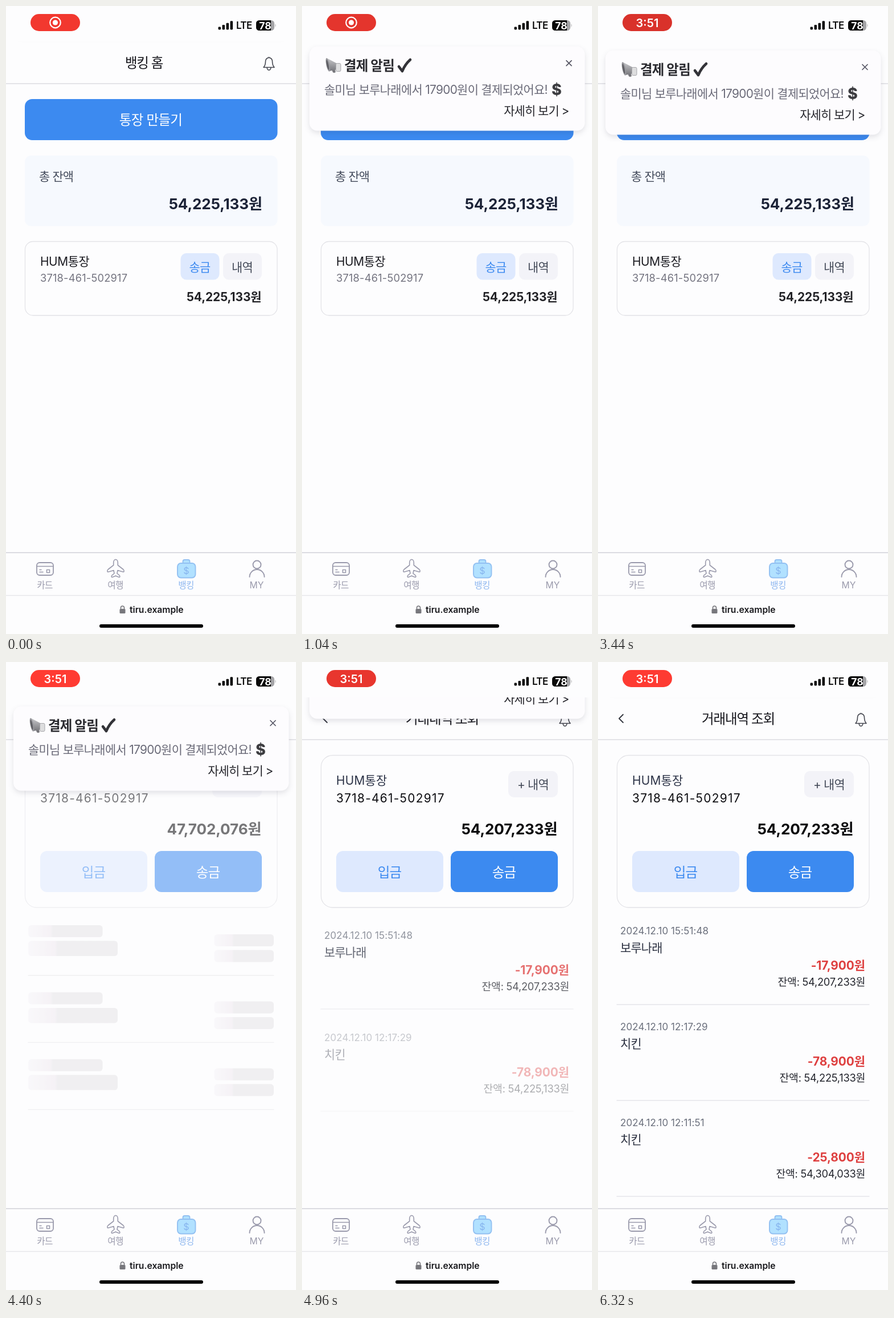
These frames come from a looping animation (509 by 1100 pixels, 6400 ms). An HTML page:

```html
<!DOCTYPE html>
<html lang="ko">
<head>
<meta charset="utf-8">
<title>뱅킹</title>
<style>
  html, body { margin: 0; width: 100%; height: 100%; overflow: hidden; background: #fdfdfe; }
  svg { display: block; width: 100%; height: 100%; }
  text { font-family: Inter, 'Noto Sans CJK KR', sans-serif; white-space: pre; }
  .toast { filter: drop-shadow(0 4px 5px rgba(30, 30, 60, .12)); }
  .line { fill: none; stroke-linecap: round; stroke-linejoin: round; }
</style>
</head>
<body>
<svg id="stage" viewBox="0 0 509 1100"></svg>
<script>
const LOOP = 6400, STEP = 80;
const PAGE_AT = 4235, ROWS_AT = 4760, CLOCK_AT = 1520;
const TOTAL = 54207233;
const BG = '#fdfdfe', BLUE = '#3c8af0', PALE = '#dee9fe', GREY = '#f3f3f8', NAV = '#9a9aac';
const ACCOUNT = 'HUM통장', NUMBER = '3718-461-502917';

// cy is the optical middle of the text line
function text(str, x, cy, size, fill, { anchor = 'start', weight = 400, gap = -.04, id = '' } = {}) {
  return `<text id="${id}" x="${x}" y="${cy + size * .365}" font-size="${size}" fill="${fill}"
    text-anchor="${anchor}" font-weight="${weight}" letter-spacing="${gap * size}">${str}</text>`;
}
const mid = (str, x, cy, size, fill, more) => text(str, x, cy, size, fill, { anchor: 'middle', ...more });
const end = (str, x, cy, size, fill, more) => text(str, x, cy, size, fill, { anchor: 'end', ...more });
const box = (x, y, w, h, r, fill, more = '') =>
  `<rect x="${x}" y="${y}" width="${w}" height="${h}" rx="${r}" fill="${fill}" ${more}/>`;
const line = (d, color, width, more = '') =>
  `<path class="line" d="${d}" stroke="${color}" stroke-width="${width}" ${more}/>`;
const rule = (y, color, x1 = 0, x2 = 509) => line(`M${x1} ${y}H${x2}`, color, 1.3);
const outline = 'stroke="#e4e4e8" stroke-width="1.3"';
const bold = { weight: 700, gap: -.004 };

const home = `<g id="home">
  ${mid('뱅킹 홈', 242, 99, 23.5, '#16161c', { weight: 500, gap: -.055 })}
  ${box(33, 163, 443.5, 72, 13, BLUE)}
  ${mid('통장 만들기', 254, 199, 23.5, '#fff', { gap: -.03 })}
  ${box(33, 262, 443.5, 123.5, 11, '#f6f9fe')}
  ${text('총 잔액', 58, 298, 20.9, '#434a5a')}
  ${end('54,225,133원', 450, 346, 26.1, '#1c2337', bold)}
  ${box(33.5, 412.5, 442.5, 129.5, 14, BG, outline)}
  ${text(ACCOUNT, 60, 447, 20.9, '#1c1c22', { gap: -.02 })}
  ${text(NUMBER, 60, 476, 18.3, '#747480', { gap: .01 })}
  ${box(306.5, 433, 68, 46.5, 10, PALE)}
  ${mid('송금', 340, 457, 20.9, BLUE)}
  ${box(381, 433, 68, 46.5, 10, GREY)}
  ${mid('내역', 414.5, 457, 20.9, '#444a58')}
  ${end('54,225,133원', 448.5, 509, 20.9, '#222226', bold)}
</g>`;

const bar = (x, y, w, h) => box(x, y, w, h, 5.5, 'url(#shimmer)');
const skeleton = [0, 1, 2].map(i => `<g transform="translate(0 ${i * 117.4})">
  ${bar(39, 461, 130.5, 21)}${bar(39, 488.5, 157, 26.5)}
  ${bar(365.5, 477, 104.5, 21)}${bar(365.5, 504.5, 104.5, 21)}
  ${rule(549, '#e4e4e8', 39, 470)}</g>`).join('');

const rows = [
  ['15:51:48', '보루나래', '-17,900', '54,207,233'],
  ['12:17:29', '치킨', '-78,900', '54,225,133'],
  ['12:11:51', '치킨', '-25,800', '54,304,033'],
].map(([time, name, amount, left]) => `<g class="row">
  ${text('2024.12.10 ' + time, 39, 471, 17, '#6a6f7c', { gap: .005 })}
  ${text(name, 39, 500, 20.9, '#2b3040')}
  ${end(amount + '원', 469, 531, 20.9, '#de4040', bold)}
  ${end(`잔액: ${left}원`, 469, 560, 18.3, '#24262e', { gap: -.015 })}
  ${rule(600, '#e6e6ea', 33, 476)}</g>`).join('');

const detail = `<g id="detail">
  ${line('M44 92l-7 7 7 7', '#33363f', 1.8)}
  ${mid('거래내역 조회', 246, 99, 23.5, '#16161c', { weight: 500, gap: -.05 })}
  <g id="content">
    ${box(33.5, 163.5, 442.5, 266.5, 20, BG, outline)}
    ${text(ACCOUNT, 60, 207, 20.9, '#2c3347', { gap: .01 })}
    ${text(NUMBER, 60, 238, 20.9, '#0c0c10', { gap: .06 })}
    ${box(362, 191, 87, 46, 10, GREY)}
    ${mid('+ 내역', 405.5, 214.5, 20.9, '#444a58')}
    ${end('', 448.5, 292, 26.1, '#0a0a0c', { ...bold, id: 'balance' })}
    ${box(60, 331, 188, 72, 12, PALE)}
    ${mid('입금', 153.5, 368, 23.5, BLUE)}
    ${box(261, 331, 188, 72, 12, BLUE)}
    ${mid('송금', 354.5, 368, 23.5, '#fff')}
    <g id="skeleton">${skeleton}</g>
  </g>
  ${rows}
</g>`;

const bell = line('M452 107.5c3-3 3.5-6 3.5-10.5a6 6.5 0 0 1 12 0c0 4.5.5 7.5 3.5 10.5zM458.2 108a3.3 4.2 0 0 0 6.6 0M461.5 90.5v-1', '#44464f', 1.6);

const megaphone = `
  <path d="M51 115l3 8q2 2 5 0l-2-9z" fill="#77777c"/>
  <path d="M43 98L62 108V118L48 121z" fill="url(#metal)"/>
  ${box(59.5, 107.5, 8.5, 14, 2, '#dededf', 'stroke="#a5a5a9"')}
  <ellipse cx="45.5" cy="110" rx="3" ry="12" transform="rotate(-12 45.5 110)" fill="#98989d"/>
  <ellipse cx="45" cy="110" rx="1.6" ry="9" transform="rotate(-12 45 110)" fill="#5f5f64"/>`;

const toast = `<g id="toast">
  ${box(13, 78, 483.5, 147.5, 14, '#fdfcfe', 'class="toast"')}
  ${megaphone}
  ${text('결제 알림', 74, 111, 23.5, '#2b2b30', { weight: 700, gap: -.035 })}
  ${line('M170 113l6 8Q181 109 190 101', '#333338', 4.6)}
  ${line('M464 102.5l9 9m0-9l-9 9', '#555563', 1.7)}
  ${text('솔미님 보루나래에서 17900원이 결제되었어요!', 39, 153, 20.9, '#6a6a78', { gap: -.033 })}
  ${mid('$', 447, 153, 27, '#3c3c40', { weight: 800, gap: 0 })}
  ${end('자세히 보기 &gt;', 468.5, 190.5, 20.9, '#26262c', { gap: -.045 })}
</g>`;

const signal = [0, 1, 2, 3].map(i => box(372.5 + i * 7, 36.5 - i * 3.4, 4.6, 5 + i * 3.4, 1.4, '#0a0a0a')).join('');
const statusBar = `${box(0, 0, 509, 62, 0, BG)}
  <rect id="pill" x="43" y="14" width="87" height="30" rx="15"/>
  <g id="record"><circle cx="86.5" cy="29" r="9.3" fill="none" stroke="#fff" stroke-width="2.2"/>
    <circle cx="86.5" cy="29" r="4.6" fill="#fff"/></g>
  ${mid('3:51', 86.5, 29.5, 20, '#fff', { weight: 600, gap: 0, id: 'clock' })}
  ${signal}
  ${text('LTE', 404, 34, 17, '#0a0a0a', { weight: 600 })}
  ${box(439, 25, 32, 18, 5.5, '#a5a5a8')}
  <path d="M444.5 25H465V43H444.5a5.5 5.5 0 0 1-5.5-5.5V30.5a5.5 5.5 0 0 1 5.5-5.5z" fill="#0a0a0a"/>
  <path d="M472.5 31q2 3 0 6z" fill="#a5a5a8"/>
  ${mid('78', 455, 34.2, 17.5, '#fff', { weight: 700, gap: 0 })}`;

const halfPlane = line('M192.5 969.5c-2.5 0-3.8 3-3.8 6v4l-9.7 7.5q-1.5 1.3-1 3.5 .2 1 1.5.7l9.5-2.7 1 5.5-4 3.2q-1 1-.8 2.6 .3.9 1.3.6l6-2.2', NAV, 1.6);
const navBar = `${box(0, 957, 509, 143, 0, BG)}
  ${rule(957.5, '#cfcfd6')}${rule(1032.5, '#e6e6ea')}
  ${box(54, 975, 29, 22, 5, 'none', `stroke="${NAV}" stroke-width="1.8"`)}
  ${line('M54 981.5H83M59 987.5h3M59 991.5h6M71.5 987.5h5v5h-5z', NAV, 1.6)}
  ${halfPlane}<g transform="matrix(-1 0 0 1 385 0)">${halfPlane}</g>
  ${box(310.5, 970, 12, 10, 3, '#b1e1ff', 'stroke="#93c1f2" stroke-width="1.9"')}
  ${box(301, 976, 31.5, 25.5, 6, '#b1e1ff', 'stroke="#93c1f2" stroke-width="1.9"')}
  ${mid('$', 316.5, 988.8, 16, '#86b4ee', { gap: 0 })}
  ${line('M427.5 1000a13 13 0 0 1 26 0', NAV, 1.9)}
  <circle cx="440.5" cy="978.5" r="7" fill="${BG}" stroke="${NAV}" stroke-width="1.9"/>
  ${['카드', '여행', '뱅킹', 'MY'].map((label, i) =>
    mid(label, 68 + i * 124, 1014, 15.7, i === 2 ? '#8fb8f0' : NAV, { gap: i === 3 ? 0 : -.04 })).join('')}
  ${line('M201.5 1056v-2a3 3 0 0 1 6 0v2', '#77777c', 1.6)}
  ${box(199.5, 1056, 10, 8, 1.6, '#77777c')}
  ${text('tiru.example', 217, 1057.5, 15.7, '#18181c', { weight: 600, gap: 0 })}
  ${box(164, 1083, 182, 6, 3, '#000')}`;

const stage = document.getElementById('stage');
stage.innerHTML = `<defs>
    <linearGradient id="shimmer" x1="-.33" x2=".67">
      <stop stop-color="#e5e4e6"/><stop offset=".33" stop-color="#f6f4f7"/>
      <stop offset=".63" stop-color="#efe9ee"/><stop offset=".66" stop-color="#e5e4e6"/>
    </linearGradient>
    <linearGradient id="metal" x2="0" y2="1">
      <stop stop-color="#c9c9cc"/><stop offset="1" stop-color="#77777c"/>
    </linearGradient>
  </defs>
  ${box(0, 0, 509, 1100, 0, BG)}${rule(136, '#dcdce1')}${bell}
  ${home}${detail}${toast}${statusBar}${navBar}`;

const $ = id => document.getElementById(id);
const rowNodes = [...document.querySelectorAll('.row')];
const progress = (t, from, length) => Math.min(1, Math.max(0, (t - from) / length));
const smooth = p => p * p * (3 - 2 * p);
const show = (id, on) => $(id).setAttribute('visibility', on ? 'visible' : 'hidden');

function draw(t) {
  const glow = .925 + .075 * Math.cos((t - 400) / 1000 * Math.PI);
  $('pill').setAttribute('fill', `rgb(${[255, 59, 50].map(c => Math.round(c * glow))})`);
  show('record', t < CLOCK_AT);
  show('clock', t >= CLOCK_AT);

  const hidden = 1 - smooth(progress(t, 798, 275)) + smooth(progress(t, 4781, 275));
  $('toast').setAttribute('transform', `translate(0 ${-175 * hidden})`);

  $('home').style.display = t < PAGE_AT ? '' : 'none';
  $('detail').style.display = t < PAGE_AT ? 'none' : '';
  $('content').setAttribute('opacity', progress(t, PAGE_AT, 300));
  const count = progress(t, PAGE_AT, 539.422);
  const amount = count < 1 ? TOTAL * (1 - 2 ** (-10 * count)) : TOTAL;
  $('balance').textContent = Math.round(amount).toLocaleString('en-US') + '원';

  $('skeleton').style.display = t < ROWS_AT ? '' : 'none';
  $('shimmer').setAttribute('gradientTransform', `translate(${(t - 4400) / 1000} 0)`);
  rowNodes.forEach((row, i) => {
    const p = progress(t, ROWS_AT + i * 100, 272);
    row.setAttribute('opacity', p);
    row.setAttribute('transform', `translate(0 ${i * 168 + 30 * (1 - p)})`);
  });
}

function tick() {
  const t = performance.now() % LOOP;
  draw(Math.floor(t / STEP) * STEP);
  requestAnimationFrame(tick);
}
tick();
</script>
</body>
</html>
```
